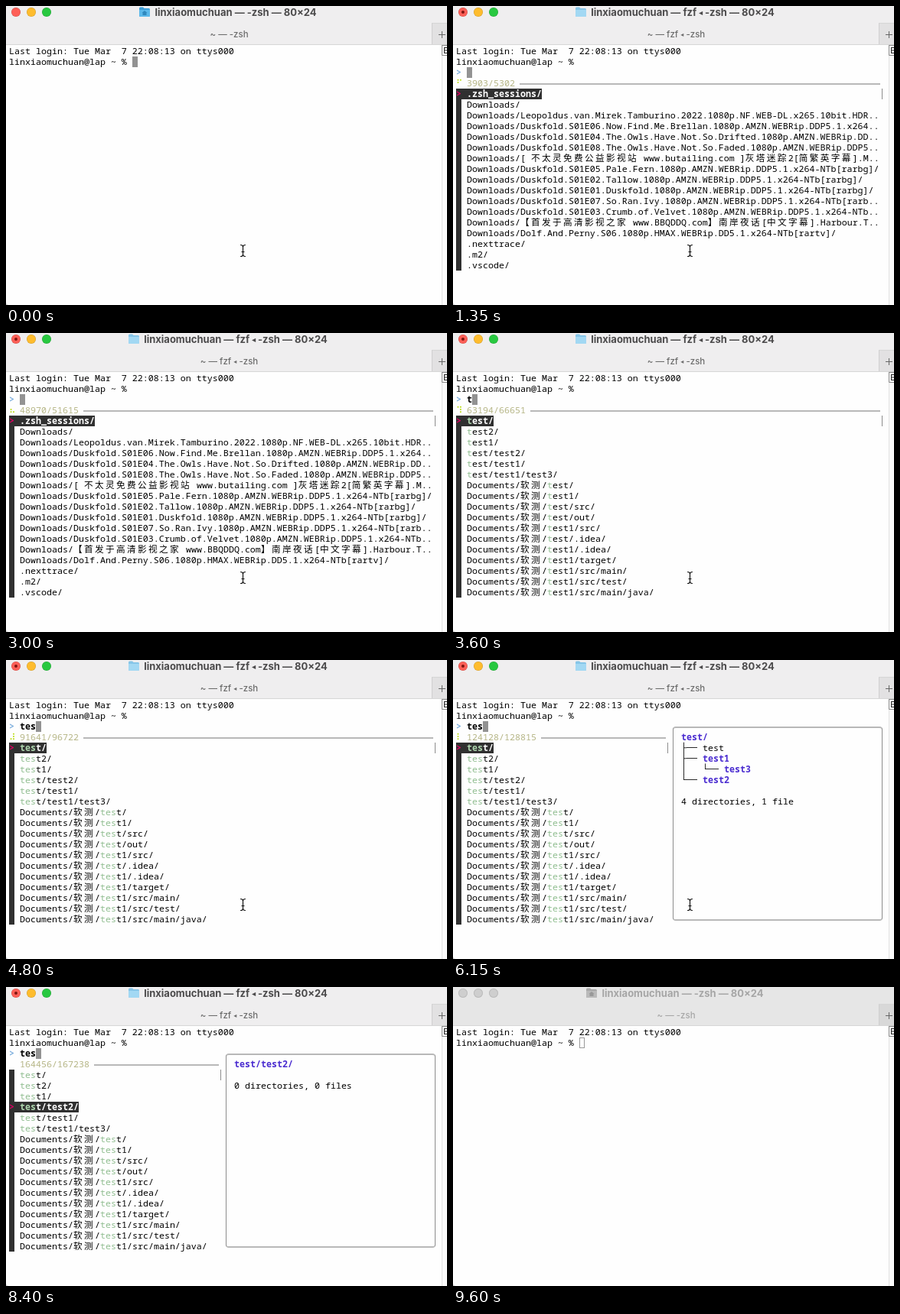
An HTML page for the animation above (9.62 s loop, 576x391 px).

```html
<!DOCTYPE html>
<html lang="en">
<head>
<meta charset="utf-8">
<title>Terminal: fuzzy directory search</title>
<style>
  html, body { margin: 0; width: 100%; height: 100%; overflow: hidden; background: #c9c9c9; }
  #win { position: absolute; left: 0; top: 0; width: 576px; height: 391px; overflow: hidden;
    background: #fefefe; border-bottom-left-radius: 4px; }
  #win div, #win svg { position: absolute; }

  /* window chrome */
  #bar { left: 0; top: 0; width: 576px; height: 50px; background: #efeeef; border-bottom: 1px solid #d6d6d6; }
  .light { top: 2px; width: 12px; height: 12px; border-radius: 50%; box-shadow: inset 0 0 0 .5px #0003; }
  .light.busy::after { content: ""; position: absolute; left: 4px; top: 4px; width: 4px; height: 4px;
    border-radius: 50%; background: #7d1510; }
  #title { left: 0; top: 0; width: 580px; height: 16px; display: flex; justify-content: center; gap: 6px;
    font: 700 13px/16px Inter, sans-serif; color: #4b4a4b; white-space: pre; }
  #win #title svg { position: static; }
  #tab { left: 0; top: 29px; width: 583px; text-align: center; white-space: pre;
    font: 500 11.5px/16px Inter, sans-serif; color: #6c6c6c; }
  small { font-size: .7em; vertical-align: 1px; line-height: 1; }
  #add { left: 556px; top: 22px; width: 20px; height: 28px; background: #e2e1e2;
    border-left: 1px solid #cfcfcf; border-top: 1px solid #d6d6d6; box-sizing: border-box; }
  #add::before, #add::after { content: ""; position: absolute; background: #666; }
  #add::before { left: 8px; top: 14px; width: 9px; height: 1px; }
  #add::after { left: 12px; top: 10px; width: 1px; height: 9px; }
  #scroll { left: 569px; top: 51px; width: 6px; height: 340px; background: #fafafa; border-left: 1px solid #e1e1e1; }
  #split { left: 569px; top: 51px; }

  .off #bar { background: #e6e6e6; }
  .off #add { background: #d8d8d8; }
  .off .light { background: #cecece !important; box-shadow: inset 0 0 0 1px #bcbcbc; }
  .off #title, .off #tab { color: #a6a6a6; }
  .off #title svg { filter: grayscale(1); opacity: .7; }

  /* character grid: 7 x 14 px cells */
  #screen { left: 4px; top: 52px; }
  #screen div { white-space: pre; color: #000; }
  #screen .text { padding-bottom: 1px;
    font: 500 11.667px/13px "Noto Sans Mono", "Noto Sans CJK SC", "Noto Sans CJK", monospace; }
  .wide { display: inline-block; width: 14px; }
  #screen .b, .dir { font-weight: 700; }
  #screen .dir { color: #4a2cd0; }
  #screen .ask { color: #7fb0de; font-weight: 700; }
  #screen .info { color: #b5b585; }
  #screen .spin { color: #b4d800; }
  #screen .ptr { color: #d7005f; font-weight: 700; }
  #screen .sel { color: #fff; font-weight: 700; background: #303030; }
  .hit { color: #8fbd8f; }
  .sel .hit { color: #afd7af; }
  .gutter { background: #303030; }
  .cur { background: #929292; }
  .off .cur { background: none; box-shadow: inset 0 0 0 1px #999; }
  .thumb { background: #8c8c8c; }
  .rule { background: #b8b8b8; }
  .frame { border: solid #b8b8b8; border-width: 2px 1px; border-left-color: #8c8c8c; border-right-color: #8c8c8c;
    border-radius: 4px; box-sizing: border-box; }
</style>
</head>
<body>
<div id="win">
  <div id="bar">
    <div class="light" id="close" style="left:7px;background:#fe5f57"></div>
    <div class="light" style="left:27px;background:#febc2e"></div>
    <div class="light" style="left:47px;background:#28c840"></div>
    <div id="title">
      <svg width="14" height="16" viewBox="0 0 14 16">
        <path id="back" d="M0 3Q0 1.5 1.5 1.5H5L6.5 3h6Q14 3 14 4.500v8q0 1.500-1.500 1.500h-11Q0 14 0 12.500z"/>
        <path id="front" d="M0 5h14v7.500q0 1.500-1.500 1.500h-11Q0 14 0 12.500z"/>
        <path id="home" d="M7 6l3.500 3h-1v3h-5V9h-1z" fill="#2f88bd"/>
      </svg>
      <span id="name"></span>
    </div>
    <div id="tab"></div>
    <div id="add"></div>
  </div>
  <div id="scroll"></div>
  <svg id="split" width="7" height="14">
    <path d="M.5 .5H8M.5 0V13.500H8" fill="none" stroke="#888"/>
    <path d="M3.500 3V11M3 3.500H7M3 7H7M3 10.500H7" fill="none" stroke="#222"/>
  </svg>
  <div id="screen"></div>
  <svg id="beam" width="9" height="18" viewBox="0 0 9 18" style="left:305px;top:311px">
    <defs>
      <path id="ibeam" d="M1.500 1.500Q4.500 1.500 4.500 4V14Q4.500 16.500 1.500 16.500M7.500 1.500Q4.500 1.500 4.500 4M7.500 16.500Q4.500 16.500 4.500 14M3 10.500H6" fill="none" stroke-linecap="round"/>
    </defs>
    <use href="#ibeam" stroke="#fff" stroke-width="3"/>
    <use href="#ibeam" stroke="#111" stroke-width="1.200"/>
  </svg>
</div>

<script>
const LOOP = 9620, STEP = 150;
const OPEN = 1200, LISTED = 1350, PREVIEW = 5700, LOADED = 7800, EXIT = 9150, RETITLE = 9300, BLUR = 9450;
const USER = 'linxiaomuchuan';
const $ = id => document.getElementById(id);

const show = (ep, tail) => `Downloads/Duskfold.S01E0${ep}.1080p.AMZN.WEBRip.${tail}`;
const full = 'DDP5.1.x264-NTb[rarbg]/';
const allDirs = [
  '.zsh_sessions/',
  'Downloads/',
  'Downloads/Leopoldus.van.Mirek.Tamburino.2022.1080p.NF.WEB-DL.x265.10bit.HDR..',
  show('6.Now.Find.Me.Brellan', 'DDP5.1.x264..'),
  show('4.The.Owls.Have.Not.So.Drifted', 'DD..'),
  show('8.The.Owls.Have.Not.So.Faded', 'DDP5..'),
  'Downloads/[ 不太灵免费公益影视站 www.butailing.com ]灰塔迷踪2[简繁英字幕].M..',
  show('5.Pale.Fern', full),
  show('2.Tallow', full),
  show('1.Duskfold', full),
  show('7.So.Ran.Ivy', 'DDP5.1.x264-NTb[rarb..'),
  show('3.Crumb.of.Velvet', 'DDP5.1.x264-NTb..'),
  'Downloads/【首发于高清影视之家 www.BBQDDQ.com】南岸夜话[中文字幕].Harbour.T..',
  'Downloads/Dolf.And.Perny.S06.1080p.HMAX.WEBRip.DD5.1.x264-NTb[rartv]/',
  '.nexttrace/', '.m2/', '.vscode/'
];
const found = [
  'test/', 'test2/', 'test1/', 'test/test2/', 'test/test1/', 'test/test1/test3/',
  ...['test', 'test1', 'test/src', 'test/out', 'test1/src', 'test/.idea', 'test1/.idea', 'test1/target',
    'test1/src/main', 'test1/src/test', 'test1/src/main/java'].map(p => `Documents/软测/${p}/`)
];

const dir = s => `<span class="dir">${s}</span>`;
const empty = path => [dir(path), '', '0 directories, 0 files'];
const tree = [dir('test/'), '├── test', '├── ' + dir('test1'), '│   └── ' + dir('test3'),
  '└── ' + dir('test2'), '', '4 directories, 1 file'];

// [time, matched, total] while the scan runs
const scan = [[1200, 0, 0], [1350, 3903, 5302], [3000, 48970, 51615], [4800, 91641, 96722],
  [6150, 124128, 128815], [LOADED, 164456, 167238]];

function count(t) {
  if (t >= LOADED) return scan.at(-1).slice(1).join('/');
  const i = scan.findLastIndex(p => p[0] <= t), [a, b] = [scan[i], scan[i + 1]];
  const k = (t - a[0]) / (b[0] - a[0]);
  return [1, 2].map(n => Math.round(a[n] + (b[n] - a[n]) * k)).join('/');
}

// latest value whose start time has passed
const at = (t, list) => list.findLast(e => t >= e[0])[1];

const wide = s => s.replace(/[\u3000-\u9fff]/g, c => `<span class="wide">${c}</span>`);
const text = (col, row, s, cls = '') =>
  `<div class="text ${cls}" style="left:${col * 7}px;top:${row * 14}px">${wide(s)}</div>`;
const box = (cls, x, y, w, h) =>
  `<div class="${cls}" style="left:${x}px;top:${y}px;width:${w}px;height:${h}px"></div>`;
const cursor = (col, row) => box('cur', col * 7, row * 14, 7, 14);

function mark(path, query) {
  const i = path.indexOf('test');
  if (!query || i < 0) return path;
  const end = i + query.length;
  return `${path.slice(0, i)}<span class="hit">${path.slice(i, end)}</span>${path.slice(end)}`;
}

function finder(t) {
  const query = at(t, [[0, ''], [3600, 't'], [3750, 'te'], [3900, 'tes']]);
  const pick = at(t, [[0, 0], [6900, 1], [7500, 2], [7650, 3]]);
  const split = t >= PREVIEW, n = count(t);
  const ruleX = 14 + n.length * 7 + 6;

  let out = text(0, 2, '&gt;', 'ask') + text(2, 2, query, 'b') + cursor(2 + query.length, 2)
    + text(2, 3, n, 'info') + box('rule', ruleX, 49, (split ? 274 : 554) - ruleX, 2);
  if (t < LOADED) {
    const f = Math.floor((t - LISTED) / 100);
    out += text(0, 3, '⠋⠙⠹⠸⠼⠴⠦⠧⠇⠏'[(f + 10) % 10], 'spin');
  }
  if (t < LISTED) return out;

  out += box('gutter', 0, 56, 7, 238) + box('thumb', split ? 276 : 556, 56, 1, 14);
  (query ? found : allDirs).forEach((path, i) => {
    const line = mark(path, query);
    out += i === pick ? text(0, 4 + i, '  ' + line, 'sel') + text(0, 4 + i, '&gt;', 'ptr') : text(2, 4 + i, line);
  });

  if (split) {
    const lines = at(t, [[0, tree], [6900, empty('test2/')], [7650, empty('test/test2/')]]);
    out += box('frame', 283, 35, 274, 254) + lines.map((s, i) => text(42, 3 + i, s)).join('');
  }
  return out;
}

function draw(t) {
  const busy = t >= OPEN && t < EXIT, titled = t >= OPEN && t < RETITLE;
  const job = titled ? 'fzf <small>◂</small> -zsh' : '-zsh';
  $('win').className = t >= BLUR ? 'off' : '';
  $('close').classList.toggle('busy', titled);
  $('name').innerHTML = `${USER} — ${job} — 80×24`;
  $('tab').innerHTML = `~ — ${job}`;
  $('back').setAttribute('fill', titled ? '#86c5e8' : '#3f9fd8');
  $('front').setAttribute('fill', titled ? '#a2d8f3' : '#5bb8ea');
  $('home').style.display = titled ? 'none' : '';
  $('screen').innerHTML = text(0, 0, 'Last login: Tue Mar  7 22:08:13 on ttys000')
    + text(0, 1, `${USER}@lap ~ %`) + (busy ? finder(t) : cursor(23, 1));
  $('beam').style.display = t < 8400 ? '' : 'none';
  $('beam').style.transform = t >= 8250 ? 'translate(34px, 12px)' : '';
}

let last = -1;
function tick(now) {
  const t = Math.floor(now % LOOP / STEP) * STEP;
  if (t !== last) draw(last = t);
  requestAnimationFrame(tick);
}
draw(0);
requestAnimationFrame(tick);
</script>
</body>
</html>
```
